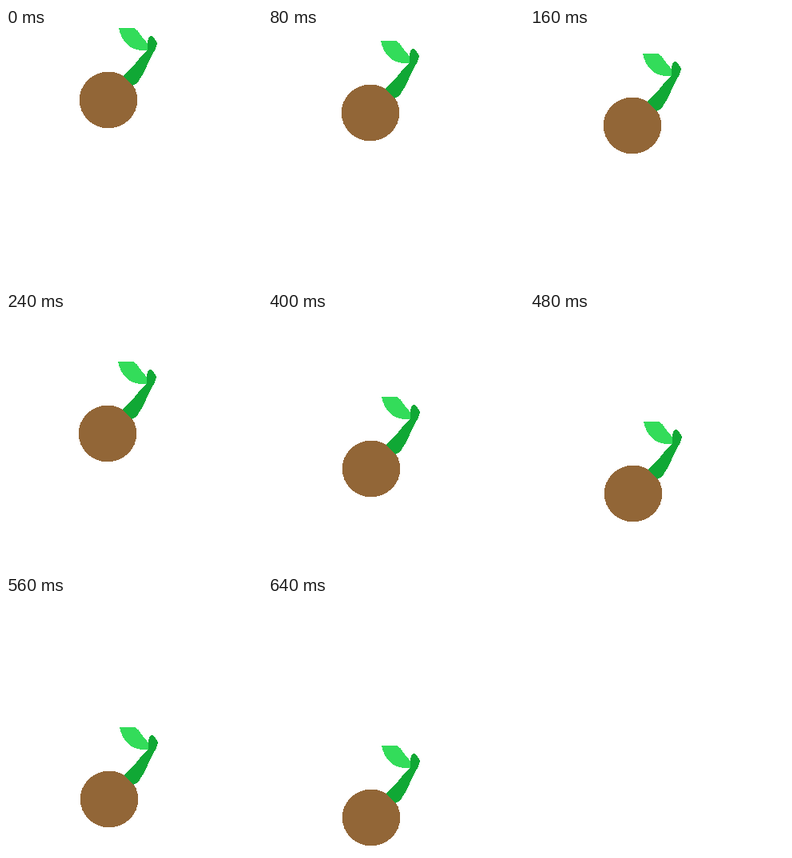
Animation, 320 px wide and 320 px high, one loop 0.72 s. Source, as an HTML page:

```html
<!DOCTYPE html>
<html lang="en">
<head>
<meta charset="utf-8">
<title>Falling seed</title>
<style>
  html, body { margin: 0; width: 100%; height: 100%; overflow: hidden; background: #fff; }
  svg { display: block; width: 100%; height: 100%; }
</style>
</head>
<body>
<svg viewBox="0 0 320 320" shape-rendering="crispEdges">
  <!-- drawn around the centre of the seed -->
  <g id="sprout" transform="translate(128 90)">
    <ellipse rx="36.3" ry="35.3" fill="#926637"/>
    <path fill="#33dc5a" d="M13-90H32C39-87 41-77 49-71V-62C28-60 16-73 13-90Z"/>
    <path fill="#10a835" d="M18-30L34-46L43-57L49-63V-73C51-82 54-84 61-71L59-64L54-55L43-32L36-21L30-18Z"/>
  </g>
</svg>
<script>
  const STEP = 80, STEPS = 9;
  // key points of the fall: step, x, y
  const keys = [
    [0, 128, 90], [2, 128, 122], [3, 127, 152],
    [5, 129, 196], [6, 129, 227], [7, 129, 254], [8, 129, 277]
  ];
  const sprout = document.getElementById('sprout');
  const start = performance.now();

  function place(step) {
    const next = Math.max(1, keys.findIndex(key => key[0] >= step));
    const [s0, x0, y0] = keys[next - 1], [s1, x1, y1] = keys[next];
    const part = (step - s0) / (s1 - s0);
    const mix = (a, b) => Math.round(a + (b - a) * part);
    return [mix(x0, x1), mix(y0, y1)];
  }

  function draw(now) {
    const step = Math.floor(Math.max(0, now - start) / STEP) % STEPS;
    sprout.setAttribute('transform', `translate(${place(step)})`);
    requestAnimationFrame(draw);
  }
  requestAnimationFrame(draw);
</script>
</body>
</html>
```
